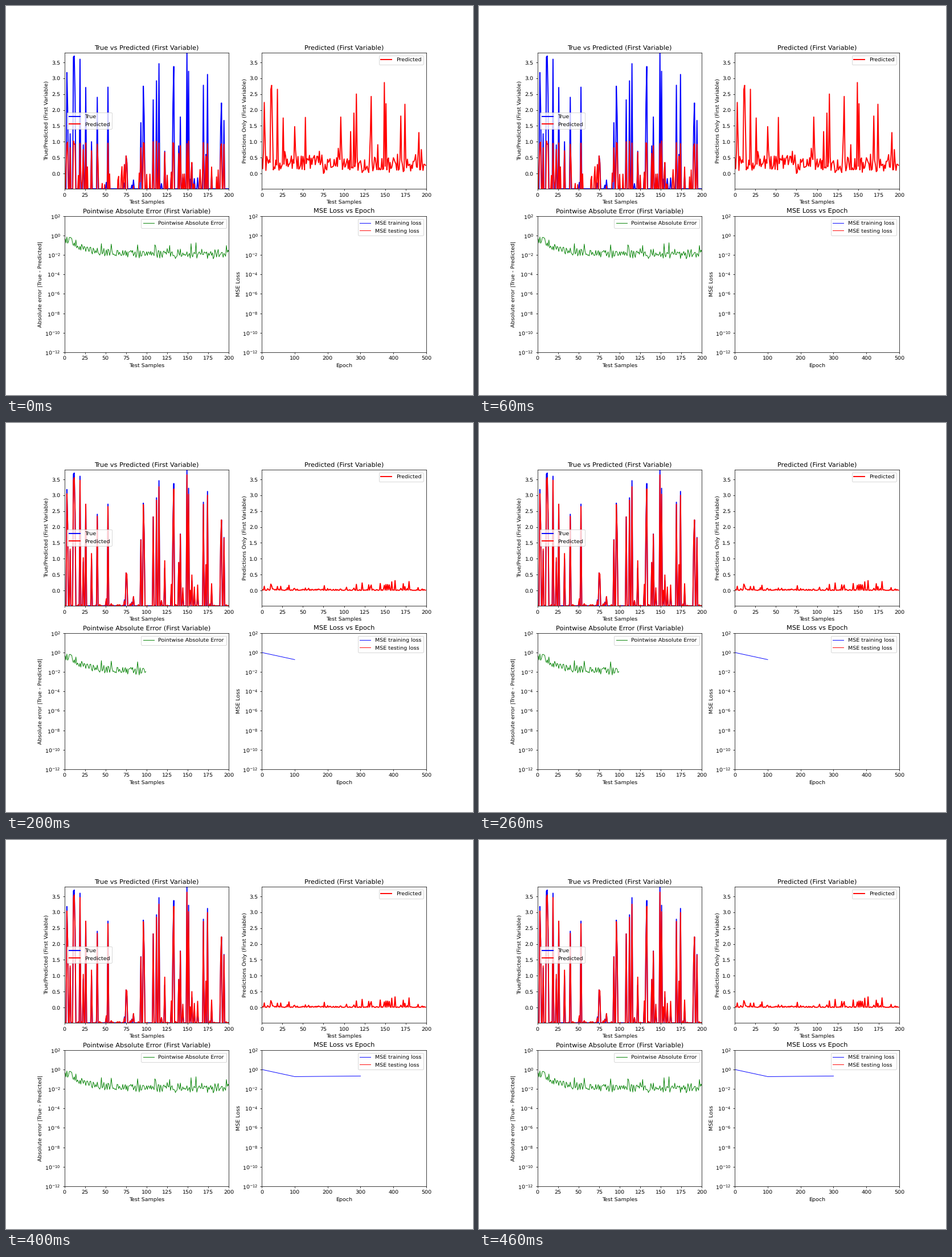
Animation, 820 px wide and 683 px high, one loop 500 ms. Source, as a matplotlib script:

```python
import numpy as np
import matplotlib.pyplot as plt
from matplotlib.animation import FuncAnimation

plt.rcParams["font.family"] = "DejaVu Sans"
plt.rcParams["text.hinting"] = "none"

DPI = 820 / 12
N = 200
BASE, TOP = -0.485, 3.806
rng = np.random.default_rng(7)
x = np.arange(N)

# The main peaks of the true series: sample index -> height.
PEAKS = {
    3: 3.18, 7: 1.25, 11: 3.67, 12: 3.7, 19: 3.6, 23: .9, 26: 2.71, 33: 1.0,
    40: 2.4, 53: 2.72, 75: .55, 93: 1.6, 96: 2.75, 108: 2.32, 112: 2.92,
    115: 3.46, 122: .7, 133: 3.37, 139: .87, 141: 1.78, 149: TOP, 151: 3.22,
    155: .31, 169: 2.78, 172: .6, 174: 3.12, 191: 2.22, 194: 1.67,
}
SHOULDERS = (4, 13, 76, 97, 132, 190)


def true_series():
    y = np.full(N, BASE)
    bumps = rng.choice(np.arange(44, 180), 12, replace=False)
    y[bumps] += rng.uniform(.1, .5, 12)
    y[list(PEAKS)] = list(PEAKS.values())
    for i in SHOULDERS:
        y[i] = .65 * max(y[i - 1], y[i + 1])
    return y


def early_guess():
    """Tall peaks saturate; the base is hazy with a few false spikes."""
    haze = rng.uniform(.08, .55, N) * np.linspace(1.1, .9, N)
    side = np.where(rng.random(N) < .2, 1.3, -1)
    squashed = .95 * np.tanh(true / .95) + rng.uniform(-.08, .08, N)
    return np.where(true > 0, squashed, true + side * haze)


def late_guess(gain, noise):
    """Low peaks come out too high, tall ones too low."""
    return true + np.where(true > -.2, gain * peak_miss, noise)


def error_trace():
    n = np.arange(N + 1)
    level = np.interp(n, [0, 10, 26, 70, N], [-.4, -.6, -1.5, -1.9, -2.05])
    spikes = np.where(rng.random(N + 1) < .12, rng.uniform(.4, 1.0, N + 1), 0)
    return 10 ** (level + rng.uniform(-.4, .4, N + 1) + spikes * (n > 30))


true = true_series()
peak_miss = .1 * (2.2 - true) + rng.normal(0, .08, N)
rough = rng.exponential(.028, N)
fine = rng.exponential(.018, N) * rng.choice([-1, 1], N)
guesses = [early_guess(), late_guess(1.25, rough)]
guesses += [late_guess(gain, fine) for gain in (.95, 1, 1.02)]

errors = error_trace()
epochs = np.arange(0, 400, 100)
losses = 10 ** np.array([0, -.73, -.70, -.67])

fig, axes = plt.subplots(2, 2, figsize=(820.01 / DPI, 683.01 / DPI), dpi=DPI)
(ax_both, ax_pred), (ax_err, ax_loss) = axes


def dress(ax, title, xlabel, ylabel, xmax, loc="upper right"):
    ax.set(title=title, xlabel=xlabel, ylabel=ylabel, xlim=(0, xmax))
    ax.legend(loc=loc)


def log_scale(ax):
    ax.set_yscale("log")
    ax.set_ylim(1e-12, 1e2)
    ax.set_yticks(10.0 ** np.arange(-12, 3, 2))
    ax.minorticks_off()
    ax.yaxis.labelpad = 1.8


ax_both.plot(x, true, "b", lw=2, label="True")
both_line, = ax_both.plot([], [], "r", lw=2, label="Predicted")
pred_line, = ax_pred.plot([], [], "r", lw=2, label="Predicted")
err_line, = ax_err.plot([], [], "g", lw=1, label="Pointwise Absolute Error")
loss_line, = ax_loss.plot([], [], "b", lw=1, label="MSE training loss")
ax_loss.plot([], [], "r", lw=1, label="MSE testing loss")

dress(ax_both, "True vs Predicted (First Variable)", "Test Samples",
      "True/Predicted (First Variable)", N, "center left")
dress(ax_pred, "Predicted (First Variable)", "Test Samples",
      "Predictions Only (First Variable)", N)
dress(ax_err, "Pointwise Absolute Error (First Variable)", "Test Samples",
      "Absolute error |True - Predicted|", N)
dress(ax_loss, "MSE Loss vs Epoch", "Epoch", "MSE Loss", 500)
for ax in (ax_both, ax_pred):
    ax.set_ylim(BASE, TOP)
    ax.set_yticks(np.arange(0, 3.6, .5))
for ax in (ax_both, ax_pred, ax_err):
    ax.set_xticks(range(0, N + 1, 25))
for ax in (ax_err, ax_loss):
    log_scale(ax)


def update(i):
    both_line.set_data(x, guesses[i])
    pred_line.set_data(x, np.abs(true - guesses[i]))
    # The error trace still shows its finished state when the loop restarts.
    n = min(100 * (i - 1), N + (i > 3)) if i else N + 1
    err_line.set_data(np.arange(n), errors[:n])
    loss_line.set_data(epochs[:i], losses[:i])
    return both_line, pred_line, err_line, loss_line


anim = FuncAnimation(fig, update, frames=5, interval=100, repeat=True,
                     repeat_delay=0)
plt.show()
```
